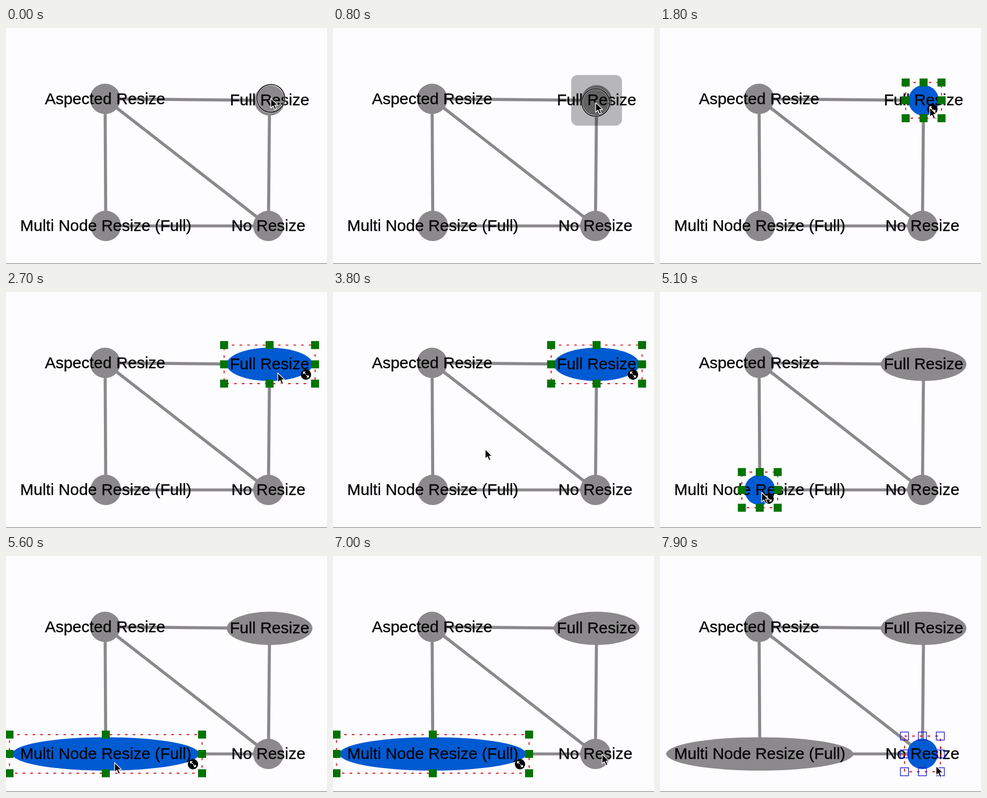
Recreate the animation shown at these times as an HTML page. Size 600x443 px, loop 8000 ms.

```html
<!DOCTYPE html>
<html lang="en">
<head>
<meta charset="utf-8">
<title>Node resize</title>
<style>
  html, body { margin: 0; width: 100%; height: 100%; overflow: hidden; background: #fdfcfe; }
  svg { display: block; width: 100%; height: 100%; }
  text {
    font: 30px "Liberation Sans", Arial, sans-serif; text-anchor: middle;
    fill: #060606; stroke: #060606; stroke-width: 0.35px;
  }
</style>
</head>
<body>
<svg id="stage" viewBox="0 0 600 443"></svg>
<script>
const LOOP = 8000, STEP = 100;
const GREY = '#8b898b', BLUE = '#005ad2', GREEN = '#007300';
const R = 28.5, PAD = 5, GRIP = 15;

// Each node: centre, label baseline, fitted radii, and the times of its states.
const nodes = [
  { label: 'Aspected Resize', x: 185.2, y: 133, base: 143 },
  { label: 'Full Resize', x: 492.7, y: 135.8, base: 145, fit: [80, 31.2],
    fitAt: 2200, press: [700, 1400], select: [1300, 4900] },
  { label: 'Multi Node Resize (Full)', x: 186.5, y: 371.5, base: 381, fit: [175, 31.3],
    fitAt: 5400, press: [4300, 5000], select: [4900, 7500] },
  { label: 'No Resize', x: 490.5, y: 371.5, base: 381,
    press: [7100, 7600], select: [7500, LOOP] }
];
const links = [[0, 1], [0, 2], [0, 3], [1, 3], [2, 3]];
const clicks = [[0, 100], [700, 1400], [2100, 2300], [4300, 5000], [5300, 5500], [7100, 7500]];
const pointerPath = [
  [0, 495, 132], [400, 495, 132], [800, 491, 140], [1350, 491, 140],
  [2000, 508, 152], [3150, 508, 152], [4200, 177, 364], [4900, 177, 364],
  [5300, 203, 388], [6050, 203, 388], [6950, 503, 372], [7400, 503, 372],
  [7600, 486, 337], [7900, 516, 394]
];

const stage = document.getElementById('stage');

function add(parent, tag, attrs = {}) {
  const el = document.createElementNS('http://www.w3.org/2000/svg', tag);
  set(el, attrs);
  parent.appendChild(el);
  return el;
}
function set(el, attrs) {
  for (const key in attrs) el.setAttribute(key, attrs[key]);
}
function show(el, on) {
  el.setAttribute('visibility', on ? 'visible' : 'hidden');
}
function within(t, span) {
  return !!span && t >= span[0] && t < span[1];
}

for (const [a, b] of links) {
  add(stage, 'line', {
    x1: nodes[a].x, y1: nodes[a].y, x2: nodes[b].x, y2: nodes[b].y,
    stroke: GREY, 'stroke-width': 5.7
  });
}
for (const n of nodes) {
  n.shape = add(stage, 'ellipse', { cx: n.x, cy: n.y });
  n.overlay = add(stage, 'rect', {
    x: n.x - 47.5, y: n.y - 47.5, width: 95, height: 95, rx: 12, fill: '#000', opacity: 0.28
  });
  add(stage, 'text', { x: n.x, y: n.base }).textContent = n.label;
}

// Selection frame: dashed border, eight grips and the fit button.
const frame = add(stage, 'g');
const border = add(frame, 'rect', {
  fill: 'none', stroke: '#e0101c', 'stroke-width': 1.9, 'stroke-dasharray': '4.8 9.6'
});
const grips = [];
for (let i = -1; i <= 1; i++) {
  for (let j = -1; j <= 1; j++) {
    if (i || j) grips.push({ i, j, el: add(frame, 'rect', { width: GRIP, height: GRIP }) });
  }
}
const fitButton = add(frame, 'g');
add(fitButton, 'circle', { r: 9.7, fill: '#000' });
add(fitButton, 'path', { d: 'M-3 -3L3 3', stroke: '#fff', 'stroke-width': 1.5, 'stroke-dasharray': '3.2 2.1' });
add(fitButton, 'path', { d: 'M-5.5 -5.5H-.5L-5.5 -.5ZM5.5 5.5H.5L5.5 .5Z', fill: '#fff' });

const pointer = add(stage, 'g');
const ring = add(pointer, 'g', { fill: 'none' });
add(ring, 'circle', { r: 26, stroke: '#fff', 'stroke-width': 3.2, opacity: 0.6 });
add(ring, 'circle', { r: 26, stroke: '#000', 'stroke-width': 1.5 });
add(pointer, 'path', {
  d: 'M0 0V18L4.2 14.1L7.2 21.2L10.4 19.8L7.4 12.9H13Z',
  fill: '#000', stroke: '#fff', 'stroke-width': 1.3, 'stroke-linejoin': 'round'
});

add(stage, 'rect', { x: 0, y: 442, width: 600, height: 1, fill: '#777' });

function pointerAt(t) {
  const next = pointerPath.findIndex(p => p[0] > t);
  if (next < 0) return pointerPath[pointerPath.length - 1].slice(1);
  const [t0, x0, y0] = pointerPath[next - 1];
  const [t1, x1, y1] = pointerPath[next];
  const u = (t - t0) / (t1 - t0);
  const e = u * u * (3 - 2 * u);
  return [x0 + (x1 - x0) * e, y0 + (y1 - y0) * e];
}

function drawFrame(n, rx, ry) {
  const w = rx + PAD, h = ry + PAD;
  set(border, { x: n.x - w, y: n.y - h, width: 2 * w, height: 2 * h });
  for (const { i, j, el } of grips) {
    set(el, {
      x: n.x + i * w - GRIP / 2, y: n.y + j * h - GRIP / 2,
      fill: n.fit ? GREEN : 'none',
      stroke: n.fit ? 'none' : '#2020cf', 'stroke-width': 1.4
    });
  }
  fitButton.setAttribute('transform', `translate(${n.x + w - 17} ${n.y + h - 17})`);
  fitButton.setAttribute('display', n.fit ? 'inline' : 'none');
}

function draw(time) {
  const t = Math.floor((time % LOOP) / STEP) * STEP;
  let selected = false;
  for (const n of nodes) {
    const [rx, ry] = n.fit && t >= n.fitAt ? n.fit : [R, R];
    const on = within(t, n.select);
    set(n.shape, { rx, ry, fill: on ? BLUE : GREY });
    show(n.overlay, within(t, n.press));
    if (on) {
      drawFrame(n, rx, ry);
      selected = true;
    }
  }
  show(frame, selected);
  const [x, y] = pointerAt(t);
  pointer.setAttribute('transform', `translate(${x} ${y})`);
  show(ring, clicks.some(span => within(t, span)));
}

const start = performance.now();
function tick() {
  draw(performance.now() - start);
  requestAnimationFrame(tick);
}
tick();
</script>
</body>
</html>
```
